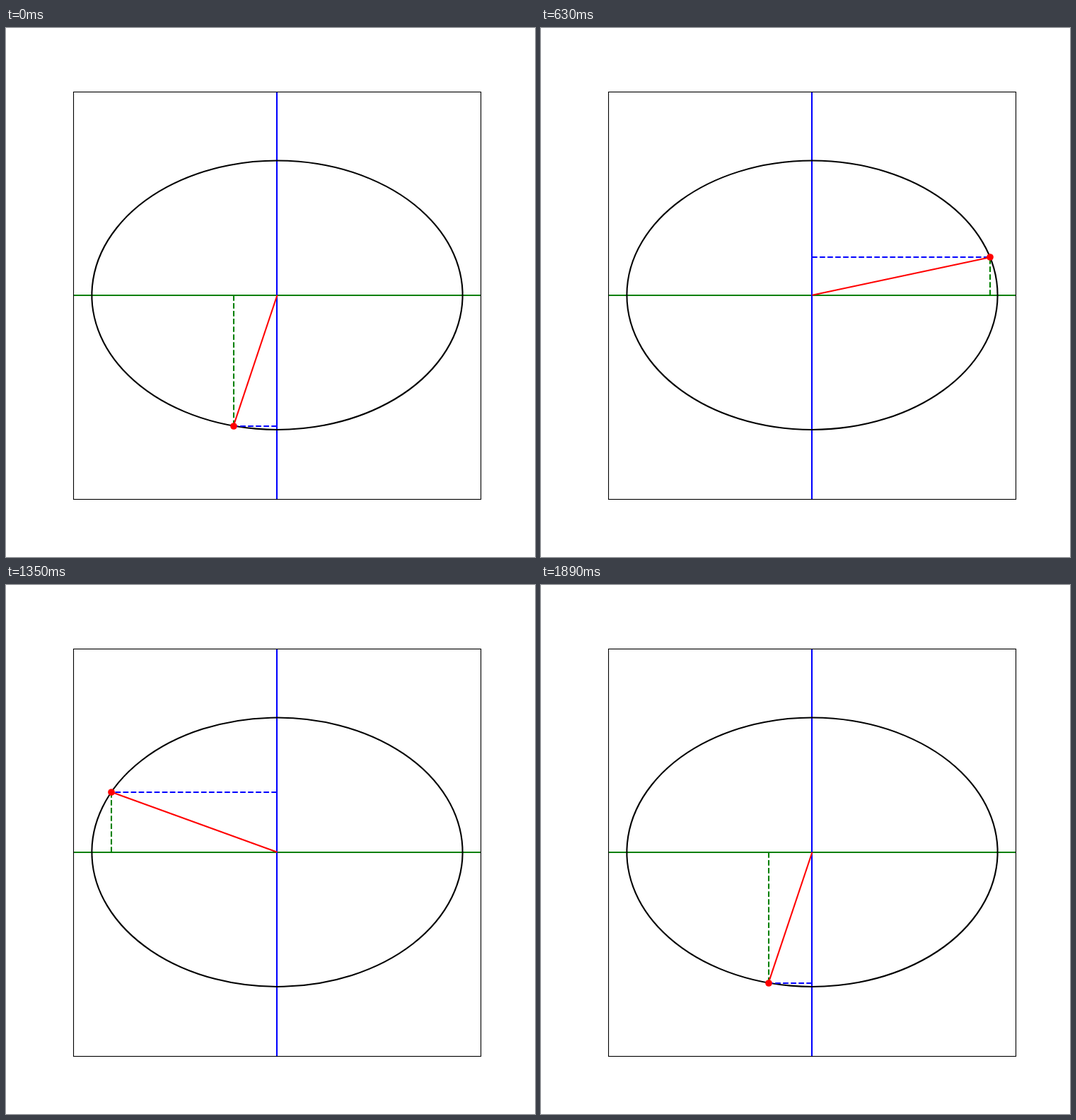
An HTML page with a canvas for the animation above (1.92 s loop, 748 by 748 pixels).

```html
<!DOCTYPE html>
<html lang="en">
<head>
<meta charset="utf-8">
<title>Point on an ellipse</title>
<style>
html, body { margin: 0; width: 100%; height: 100%; overflow: hidden; background: #fff; }
canvas { display: block; }
</style>
</head>
<body>
<canvas id="stage" width="748" height="748"></canvas>
<script>
const ctx = document.getElementById('stage').getContext('2d');
const SIZE = 748, STEP_MS = 30, STEPS = 64;
const CX = 383.49, CY = 377.74, RX = 262.1, RY = 190.2;
const AXIS_X = 383, AXIS_Y = 378;
const BOX = { left: 95.5, top: 90.5, size: 576 };
const LINE = 2.083, DOT = 4.86;
const DASH = [7.708, 3.333];
const GREEN = '#008000', BLUE = '#0000ff', RED = '#ff0000';
const rad = deg => deg * Math.PI / 180;

function line(x1, y1, x2, y2, color, dash = []) {
  ctx.strokeStyle = color;
  ctx.lineWidth = LINE;
  ctx.lineCap = 'butt';
  ctx.setLineDash(dash);
  ctx.beginPath();
  ctx.moveTo(x1, y1);
  ctx.lineTo(x2, y2);
  ctx.stroke();
  ctx.setLineDash([]);
}

function draw(step) {
  const angle = rad(-103.65 + step * 360 / (STEPS - 1));
  const x = CX + RX * Math.cos(angle);
  const y = CY - RY * Math.sin(angle);
  const px = Math.round(x), py = Math.round(y);

  ctx.fillStyle = '#fff';
  ctx.fillRect(0, 0, SIZE, SIZE);

  line(BOX.left, AXIS_Y, BOX.left + BOX.size, AXIS_Y, GREEN);
  line(AXIS_X, BOX.top, AXIS_X, BOX.top + BOX.size, BLUE);

  // The curve's seam travels ahead of the point.
  const seam = -angle - rad(28.6);
  ctx.strokeStyle = '#000';
  ctx.lineCap = 'square';
  ctx.beginPath();
  ctx.ellipse(CX, CY, RX, RY, 0, seam, seam + 2 * Math.PI);
  ctx.stroke();

  line(px, AXIS_Y, px, py, GREEN, DASH);
  line(AXIS_X, py, px, py, BLUE, DASH);
  line(CX, CY, x, y, RED);

  ctx.fillStyle = RED;
  ctx.beginPath();
  ctx.arc(px, py, DOT, 0, 2 * Math.PI);
  ctx.fill();

  ctx.strokeStyle = '#000';
  ctx.lineWidth = 1.11;
  ctx.strokeRect(BOX.left, BOX.top, BOX.size, BOX.size);
}

const start = performance.now();

function tick() {
  draw(Math.floor((performance.now() - start) / STEP_MS) % STEPS);
  requestAnimationFrame(tick);
}
tick();
</script>
</body>
</html>
```
